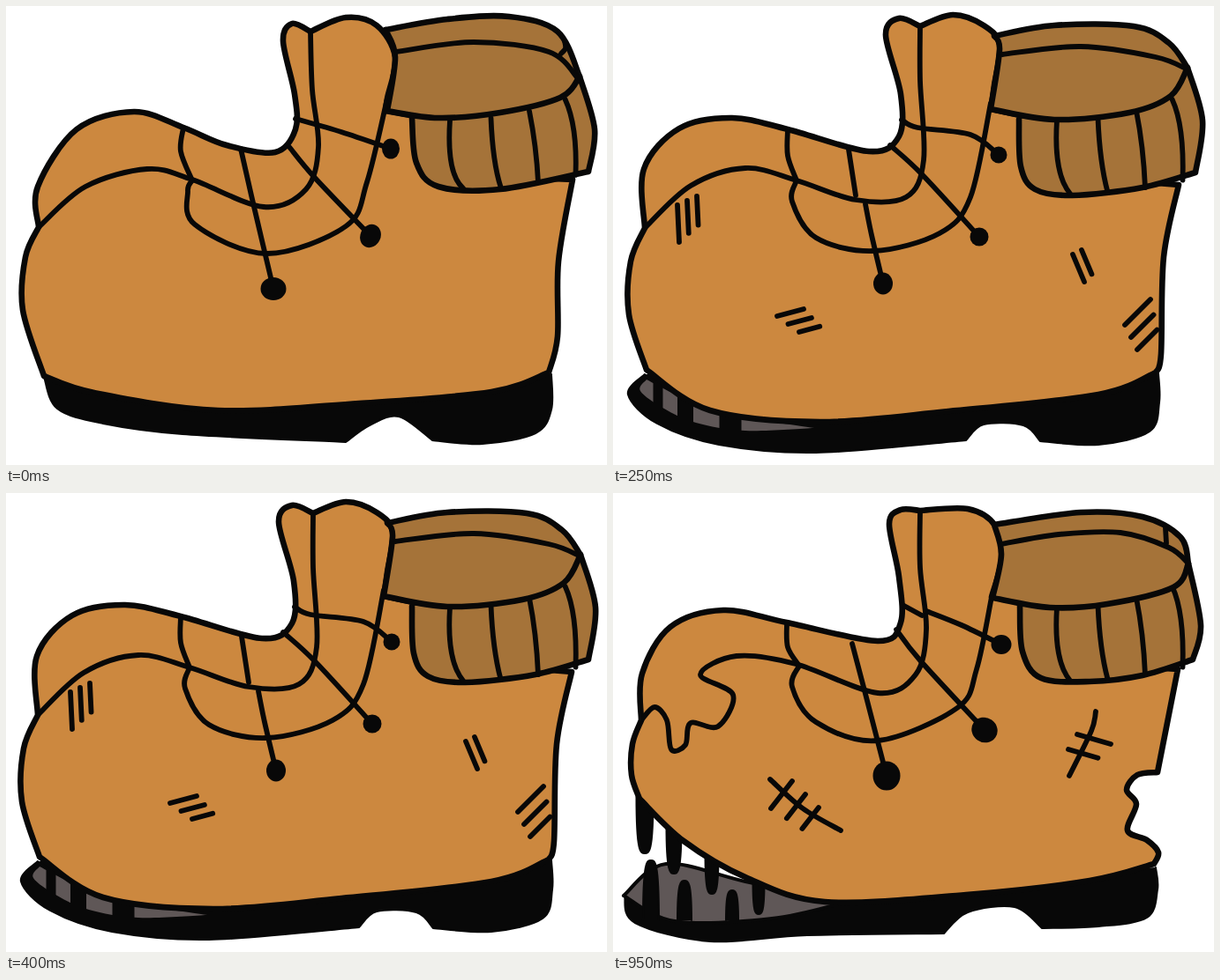
These frames come from a looping animation (681x521 px, 1250 ms). An HTML page:

```html
<!DOCTYPE html>
<html lang="en">
<head>
<meta charset="utf-8">
<title>Worn boot</title>
<style>
  html, body { margin: 0; width: 100%; height: 100%; overflow: hidden; background: #fff; }
  svg { display: block; width: 100%; height: 100%; }
  path { fill: none; stroke: #080808; stroke-width: 5.8; stroke-linecap: round; stroke-linejoin: round; }
  ellipse { fill: #080808; }
  .leather, .lining { stroke-width: 6.6; }
  .leather { fill: #cc883f; }
  .lining { fill: #a57339; }
  .rubber { fill: #080808; stroke-width: 2; }
  .insole { fill: #5f5757; stroke-width: 4; }
  .shine { fill: #5f5757; stroke: none; }
  .bar { stroke-linecap: butt; }
  .pose { visibility: hidden; animation: 1250ms step-end infinite; }
  .new { animation-name: new; }
  .scuffed { animation-name: scuffed; }
  .torn { animation-name: torn; }
  @keyframes new { 0% { visibility: visible } 20%, 100% { visibility: hidden } }
  @keyframes scuffed { 0% { visibility: hidden } 20% { visibility: visible } 40%, 100% { visibility: hidden } }
  @keyframes torn { 0% { visibility: hidden } 40%, 100% { visibility: visible } }
</style>
</head>
<body>
<svg viewBox="0 0 681 521"></svg>
<script>
  const range = n => [...Array(n).keys()];
  const parse = text => text.trim().split(/\s+/).map(pair => pair.split(',').map(Number));

  // Smooth spline through the points.
  function spline(points) {
    return points.slice(1).map((b, i) => {
      const a = points[i], before = points[i - 1] || a, after = points[i + 2] || b;
      const c1 = a.map((v, k) => v + (b[k] - before[k]) / 6);
      const c2 = b.map((v, k) => v - (after[k] - a[k]) / 6);
      return `C${c1} ${c2} ${b}`;
    }).join('');
  }

  // "/" makes the point before it a corner.
  function curve(text) {
    const runs = text.split('/').map(parse);
    let corner = runs[0].shift(), d = `M${corner}`;
    for (const run of runs) {
      d += spline([corner, ...run]);
      corner = run.at(-1);
    }
    return d;
  }

  const path = (d, name = '') => `<path class="${name}" d="${d}"/>`;
  const line = (...texts) => texts.map(text => path(curve(text))).join('');
  const shape = (name, ...parts) => path(curve(parts.join('/')), name);

  function lace(points, rx, ry, turn = 0) {
    const [x, y] = parse(points).at(-1);
    return line(points) +
      `<ellipse rx="${rx}" ry="${ry}" transform="translate(${x} ${y}) rotate(${turn})"/>`;
  }

  // Parallel strokes, each a little shorter than the last.
  const hatch = (count, x, y, dx, dy, stepX, stepY) => range(count).map(i => {
    const size = 0.88 ** i;
    return path(`M${x + i * stepX} ${y + i * stepY}l${dx * size} ${dy * size}`);
  }).join('');

  // A rounded spike from its root to its tip.
  const tooth = (x, root, tip, half) => path(
    `M${x - half} ${root}C${x - half} ${tip} ${x - half / 2} ${tip} ${x} ${tip}` +
    `S${x + half} ${tip} ${x + half} ${root}`, 'rubber');

  const teeth = () =>
    range(4).map(i => tooth(36 + 28 * i + 5 * i * i, 345 + 32 * i, 409 + 23 * i, 9.5 - i)).join('') +
    range(3).map(i => tooth(43 + 30 * i + 8 * i * i, 485, 417 + 29 * i - 6 * i * i, 9 - i)).join('');

  const shineBars = () => range(3).map(i =>
    `<path class="bar" style="stroke-width:${11 + 7 * i}"
      d="M${51 + 21 * i + 10 * i * i} ${427 + 15 * i}v36"/>`).join('');

  const ribs = hem => range(4).map(i => {
    const x = 503 + 48 * i - 1.5 * i * i, y = 130 - 2.7 * i * i;
    return path(`M${x} ${y}Q${x - 4 + 6 * i} ${y + 60 - 10 * i} ${518 + 42.5 * i} ${hem - 1.7 * i * i}`);
  }).join('');

  const boot = p =>
    shape('rubber', p.sole) + (p.soleDetail || '') +
    shape('leather', p.instep, p.tongue, '480,128 / 480,190', p.heel, p.welt, p.toe) +
    shape('lining', p.cuff) + ribs(p.hem) +
    shape('lining', p.rim) + line(p.lip, p.seam, p.collar) + p.laces + p.marks;

  const poses = {
    new: {
      sole: '43,421 58,457 110,474 200,486 385,495 / 412,476 445,466 483,493 / 540,497 600,485 618,458 618,418',
      instep: '37,251 36,205 80,140 145,120 201,138 250,158 305,166 328,140 327,100 314,40 324,20 345,29',
      tongue: '385,13 420,22 441,58 432,105 430,119',
      heel: '642,197 / 626,290 625,375 615,416',
      welt: '550,438 400,451 240,459 100,439 43,420',
      toe: '19,345 22,285 37,251',
      cuff: '460,127 465,178 490,205 560,208 660,188 / 667,140 650,80',
      hem: 207,
      rim: '430,27 500,15 570,12 625,29 650,80 / 628,104 560,121 490,127 432,119 / 441,58 430,27',
      lip: '442,52 530,41 615,52 648,82',
      seam: '37,251 90,205 160,185 211,197 292,228 340,208 354,160 347,95 345,30',
      collar: '432,105 409,200 385,250 295,281 214,248 206,210 211,198 / 198,165 201,138',
      laces: lace('328,128 380,143 436,162', 10, 11.5) +
        lace('321,160 350,195 413,261', 11.5, 13.5, 25) +
        lace('266,162 278,215 303,321', 14.5, 13),
      marks: line('633,40 634,48 629,54')
    },
    scuffed: {
      sole: '36,418 17,441 50,474 120,498 230,507 400,493 / 420,475 465,476 484,494 / 550,498 608,483 619,450 618,417',
      soleDetail: shape('shine', '38,424 73,442 121,462 228,479 / 150,482 94,473 58,457 31,437 38,424') + shineBars(),
      instep: '36,252 35,185 75,139 135,127 198,140 290,165 324,148 326,100 309,33 324,14 348,23',
      tongue: '385,10 420,22 438,44 432,90 428,117',
      heel: '641,203 / 624,285 621,395 615,416',
      welt: '550,441 380,460 235,472 110,459 38,413',
      toe: '18,350 20,290 36,252',
      cuff: '460,129 462,182 478,208 520,215 600,206 660,189 / 668,130 651,70',
      hem: 213,
      rim: '432,34 500,22 590,23 630,42 651,70 / 632,102 585,121 500,129 428,117 / 438,50 432,34',
      lip: '441,55 530,46 615,58 651,72',
      seam: '36,252 88,204 150,184 208,198 275,220 332,217 352,175 348,85 348,23',
      collar: '428,110 405,217 370,258 295,278 230,263 203,222 208,198 / 198,170 198,140',
      laces: lace('327,129 345,138 405,146 437,169', 9.5, 9.5) +
        lace('314,158 350,191 415,262', 10.5, 10.5) +
        line('267,163 275,215') + lace('286,225 293,260 306,315', 11, 12.5),
      marks: hatch(3, 73, 226, 2, 42, 11, -5) + hatch(3, 186, 352, 30, -8, 12.5, 9) +
        hatch(2, 521, 282, 13, 31, 10, -5) + hatch(3, 580, 362, 29, -29, 7, 14)
    },
    torn: {
      sole: '13,457 25,488 110,509 220,502 375,500 / 402,476 455,470 486,494 / 550,492 605,482 617,450 615,425',
      soleDetail: shape('insole', '12,457 60,421 150,441 262,465 / 180,483 70,486 12,457') + teeth(),
      instep: '32,258 33,205 65,152 125,133 197,147 300,168 326,147 324,95 313,35 326,19 348,20',
      tongue: '402,18 433,37 440,75 429,118',
      heel: '640,200 / 617,317 / 594,320 582,337 593,353 583,383 605,394 618,408 613,421',
      welt: '540,440 400,456 240,464 150,436 80,395 30,347',
      toe: '21,320 22,285 32,258',
      cuff: '461,129 464,180 485,210 540,214 600,207 657,189 / 666,150 652,80',
      hem: 213,
      rim: '432,36 530,22 600,27 643,50 652,80 / 635,107 560,126 495,130 430,119 / 440,70 432,36',
      lip: '440,58 505,47 575,45 630,62 652,80',
      seam: '32,258 47,243 61,258 66,291 82,286 88,261 119,265 136,229 99,206 140,185 207,194 300,227 343,206 355,155 348,85 348,20',
      collar: '429,118 412,200 390,244 300,281 230,260 203,220 211,196 / 198,175 197,147',
      laces: line('328,127 350,139') + lace('355,134 395,150 440,172', 11.5, 11) +
        lace('321,155 348,190 421,269', 15, 14, 35) +
        lace('271,171 286,228 310,321', 15.5, 16.5),
      marks: line('626,40 627,57', '178,325 215,358 258,383', '547,248 542,270 517,321') +
        hatch(3, 203, 327, -24, 31, 15, 15) + hatch(2, 526, 274, 38, 11, -10, 17)
    }
  };

  document.querySelector('svg').innerHTML = Object.entries(poses)
    .map(([name, pose]) => `<g class="pose ${name}">${boot(pose)}</g>`).join('');
</script>
</body>
</html>
```
